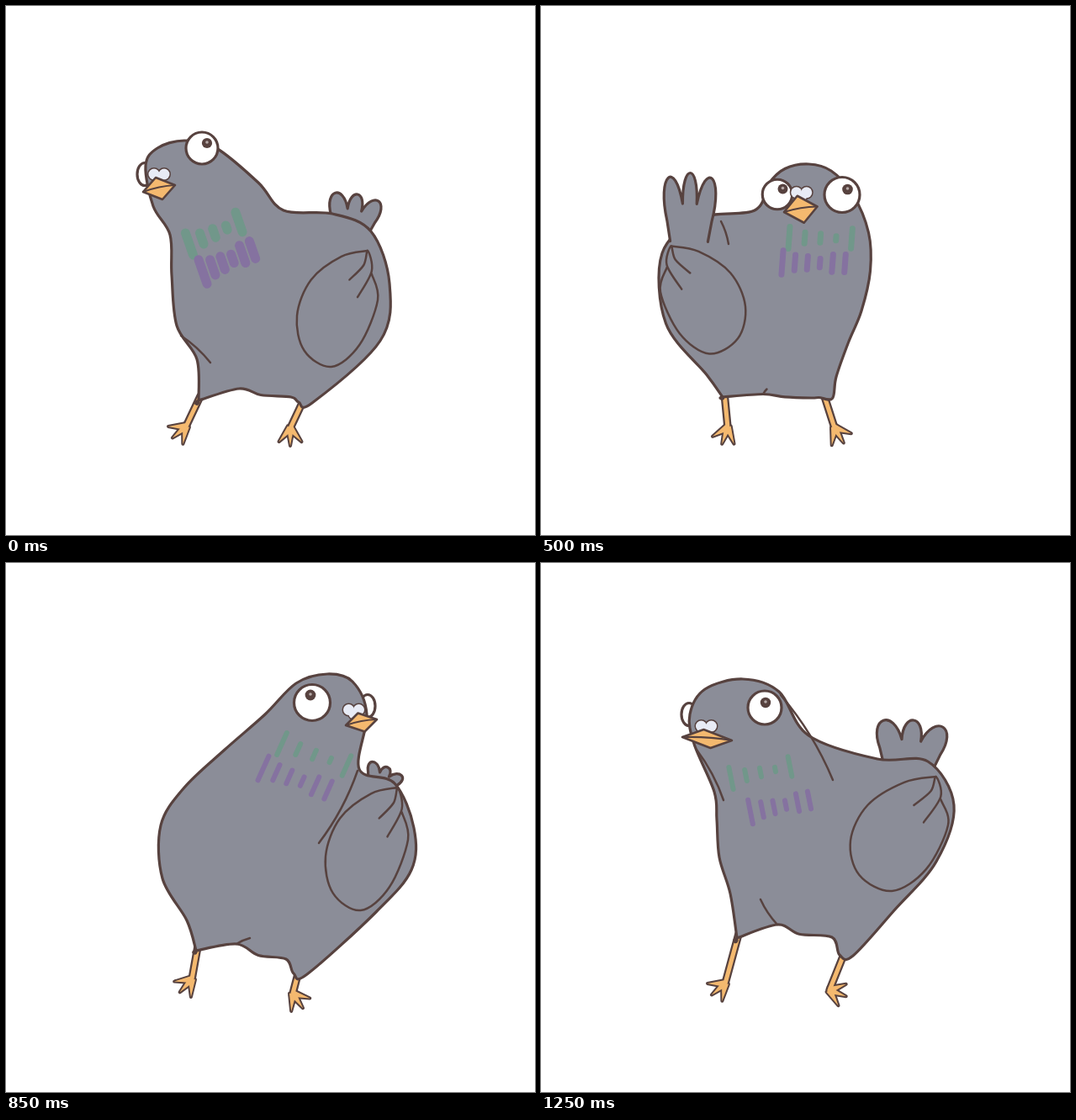
An HTML page with a canvas that plays this animation: 629 px wide and 629 px high, repeating every 1.3 s.

```html
<!DOCTYPE html>
<html lang="en">
<head>
<meta charset="utf-8">
<title>Dancing pigeon</title>
<style>
html, body { margin: 0; width: 100%; height: 100%; overflow: hidden; background: #fff; }
canvas { display: block; width: 100vmin; height: 100vmin; }
</style>
</head>
<body>
<canvas id="stage" width="629" height="629"></canvas>
<script>
const ctx = document.getElementById('stage').getContext('2d');
const INK = '#57423f', GREY = '#8b8d98', ORANGE = '#f4b96f';
const LOOP = 1300, STEP = 50;

// Rig values per pose:
//   back, front: outline points from face over the head to the right flank, and up the left side
//   belly: notch height, sag height, fold vector    tail: root, tip, half width
//   wings: centre, half width (negative mirrors, 0 hides), half height
//   eyes: centre, radius    beak: left, right, half height, cere shift
//   legs: hip, ankle, foot angle    chest: row start, row end, second row offset, slant, width
const poses = [
  { at: 0,
    back: [166,190, 180,169, 212,160, 250,169, 300,210, 330,243, 388,247, 434,268, 456,330, 445,398],
    front: [227,420, 203,380, 197,320, 195,272, 175,238],
    belly: [15, 9, 0, 0], tail: [410,265, 418,224, 28],
    wingL: [198,350, 0, 65], wingR: [394,360, 48, 69],
    eyeL: [165,200, 9], eyeR: [233,169, 19], gaze: [6, -6], beak: [163,221, 201,213, 13, 4],
    legL: [231,470, 214,500, 140], legR: [354,474, 338,502, 90],
    chest: [218,283, 277,257, 16,33, 0.35, 11], neck: [], fold: [208,392, 243,424] },
  { at: 200,
    back: [172,192, 185,172, 216,162, 258,174, 305,202, 345,248, 385,270, 419,302, 436,350, 418,422],
    front: [204,428, 178,390, 174,335, 203,286, 177,236],
    belly: [19, 9, 0, 0], tail: [300,305, 300,280, 15],
    wingL: [201,353, -27, 66], wingR: [426,352, 9, 48],
    eyeL: [170,204, 9], eyeR: [240,171, 19], gaze: [7, -5], beak: [168,226, 206,217, 13, 5],
    legL: [227,473, 223,503, 82], legR: [358,475, 346,502, 90],
    chest: [226,287, 285,260, 16,33, 0.35, 10], neck: [], fold: [] },
  { at: 400,
    back: [222,222, 235,206, 262,199, 290,208, 327,232, 368,264, 388,300, 392,340, 378,392, 350,432],
    front: [194,430, 152,365, 150,293, 190,245, 212,252],
    belly: [5, 2, 0, 0], tail: [180,285, 176,186, 28],
    wingL: [198,348, -51, 65], wingR: [390,345, 0, 48],
    eyeL: [226,237, 14], eyeR: [300,236, 26], gaze: [8, -9], beak: [215,257, 260,244, 14, 7],
    legL: [216,464, 220,500, 93], legR: [335,468, 348,499, 60],
    chest: [273,294, 337,270, 9,28, 0.3, 8], neck: [214,256, 232,310], fold: [] },
  { at: 600,
    back: [320,200, 345,181, 375,177, 400,184, 414,215, 411,275, 395,330, 370,385, 353,408, 352,450],
    front: [200,447, 145,390, 138,295, 190,259, 296,234],
    belly: [4, 3, 9, -12], tail: [172,275, 179,211, 28],
    wingL: [187,351, -50, 63], wingR: [388,345, 0, 60],
    eyeL: [336,211, 21.5], eyeR: [416,213, 16], gaze: [5, -4], beak: [363,233, 397,233, 18, 3],
    legL: [220,468, 224,502, 125], legR: [338,469, 350,504, 58],
    chest: [317,257, 402,283, -25,31, -0.45, 6], neck: [], fold: [] },
  { at: 850,
    back: [308,180, 345,143, 382,132, 412,141, 429,180, 420,245, 462,262, 485,315, 482,365, 440,415],
    front: [215,425, 186,375, 184,312, 212,267, 260,222],
    belly: [9, 20, 16, -7], tail: [445,262, 454,243, 20],
    wingL: [183,340, 0, 63], wingR: [429,340, 49, 73],
    eyeL: [364,166, 21.5], eyeR: [430,170, 9], gaze: [-2, -9], beak: [404,193, 441,186, 11, -5],
    legL: [228,462, 221,495, 133], legR: [348,491, 341,512, 55],
    chest: [328,215, 405,241, -22,29, -0.45, 6], neck: [418,247, 372,333], fold: [] },
  { at: 1100,
    back: [213,187, 228,171, 255,165, 298,175, 330,200, 352,219, 445,210, 495,232, 504,300, 478,368],
    front: [239,398, 222,355, 209,300, 207,255, 203,225],
    belly: [10, 20, 14, -7], tail: [470,230, 484,139, 37],
    wingL: [208,340, 0, 65], wingR: [436,321, 63, 80],
    eyeL: [209,208, 20], eyeR: [309,218, 21.5], gaze: [-4, -5], beak: [238,236, 281,236, 10, 0],
    legL: [238,454, 218,500, 147], legR: [354,478, 341,512, 25],
    chest: [246,285, 336,280, 0,38, 0.1, 8], neck: [343,212, 372,273], fold: [205,235, 222,290] },
  { at: 1250,
    back: [177,180, 195,150, 240,138, 283,153, 318,205, 400,233, 460,236, 491,288, 470,355, 420,413],
    front: [225,393, 212,350, 209,305, 206,272, 182,215],
    belly: [17, 24, -20, -30], tail: [437,240, 443,187, 38],
    wingL: [208,340, 0, 65], wingR: [426,322, 58, 68],
    eyeL: [176,180, 9], eyeR: [266,172, 20], gaze: [1, -6], beak: [168,207, 227,211, 11, 3],
    legL: [235,447, 219,500, 140], legR: [361,469, 343,508, 20],
    chest: [226,256, 296,242, 23,40, 0.2, 6], neck: [285,157, 347,258], fold: [185,222, 217,282] }
];
poses.push({ ...poses[0], at: LOOP });

const lerp = (a, b, u) => a + (b - a) * u;
const pairs = list => Array.from({ length: list.length >> 1 }, (_, i) => [list[2 * i], list[2 * i + 1]]);

// An empty line shrinks to, or grows from, the first point of the other one.
function mix(a, b, u) {
  if (!u || !(a.length + b.length)) return a;
  const from = a.length ? a : b.map((_, i) => b[i % 2]);
  const to = b.length ? b : a.map((_, i) => a[i % 2]);
  return from.map((v, i) => lerp(v, to[i], u));
}

function paint(path, fill, stroke = INK, width = 3.2) {
  if (fill) { ctx.fillStyle = fill; ctx.fill(path); }
  if (stroke) { ctx.strokeStyle = stroke; ctx.lineWidth = width; ctx.stroke(path); }
}

// Smooth curve through all points; a doubled point makes a corner.
function spline(p, closed) {
  const n = p.length, path = new Path2D();
  const point = i => closed ? p[(i + n) % n] : p[Math.max(0, Math.min(n - 1, i))];
  path.moveTo(...p[0]);
  for (let i = 0; i < (closed ? n : n - 1); i++) {
    const [a, b, c, d] = [-1, 0, 1, 2].map(k => point(i + k));
    path.bezierCurveTo(b[0] + (c[0] - a[0]) / 6, b[1] + (c[1] - a[1]) / 6,
      c[0] - (d[0] - b[0]) / 6, c[1] - (d[1] - b[1]) / 6, ...c);
  }
  if (closed) path.closePath();
  return path;
}

function drawBody({ back, front, belly: [rise, sag, foldX, foldY], legL: [lx, ly], legR: [rx, ry] }) {
  const hip = [lx - 2, ly - 1], notch = [lx + 46, ly - rise], low = ry - sag;
  const bottom = [[rx + 10, ry - 2], [rx - 6, ry - 3], [rx - 15, low],
    [lx + 72, lerp(notch[1], low, 0.75)], notch, hip, hip];
  paint(spline([...pairs(back), ...bottom, ...pairs(front)], true), GREY);
  if (foldX) drawFold([...notch, notch[0] + foldX, notch[1] + foldY]);
}

function drawFold([x0, y0, x1, y1]) {
  const path = new Path2D();
  path.moveTo(x0, y0);
  path.quadraticCurveTo((x0 + x1) / 2 + (y1 - y0) * 0.08, (y0 + y1) / 2 - (x1 - x0) * 0.08, x1, y1);
  paint(path, null, INK, 2.5);
}

// Three lobes on a fan; u runs along the tail, v across it.
function drawTail([x, y, tipX, tipY, half]) {
  const dx = tipX - x, dy = tipY - y, size = Math.hypot(dx, dy);
  const at = (u, v) => [x + dx * u - dy / size * half * v, y + dy * u + dx / size * half * v];
  const path = new Path2D(), edges = [-0.95, -0.3, 0.3, 0.95];
  path.moveTo(...at(0, -0.8));
  path.lineTo(...at(0.3, -0.95));
  for (let i = 0; i < 3; i++) {
    const u0 = i ? 0.55 : 0.3, u1 = i < 2 ? 0.55 : 0.3, peak = i === 1 ? 1 : 0.92;
    const lift = (peak - (u0 + u1) / 2) * 4 / 3, lean = (i - 1) * 0.42;
    path.bezierCurveTo(...at(u0 + lift, edges[i] + lean - 0.05),
      ...at(u1 + lift, edges[i + 1] + lean + 0.05), ...at(u1, edges[i + 1]));
  }
  path.lineTo(...at(0, 0.8));
  paint(path, GREY);
}

const WING = pairs([0.75,-1, 0.1,-0.9, -0.65,-0.5, -1,0.12, -0.82,0.72, -0.15,1, 0.55,0.62, 1,-0.15, 0.85,-0.6]);
const FEATHERS = pairs([0.3,-0.5, 0.65,-0.75, 0.75,-1, 0.85,-0.65, 0.5,-0.2]);

function drawWing([x, y, rx, ry]) {
  if (Math.abs(rx) < 3) return;
  for (const shape of [WING, FEATHERS])
    paint(spline(shape.map(([u, v]) => [x + u * rx, y + v * ry])), null, INK, 2.5);
}

// Shank and three tapered toes.
function drawLeg([hipX, hipY, x, y, angle]) {
  const path = new Path2D();
  path.moveTo(hipX, hipY - 6);
  path.lineTo(x, y);
  paint(path, null, INK, 9.5);
  const toes = [-40, 0, 40].map(turn => {
    const a = (angle + turn) * Math.PI / 180, c = Math.cos(a), s = Math.sin(a), toe = new Path2D();
    toe.moveTo(x - s * 4, y + c * 4);
    toe.lineTo(x + c * 21, y + s * 21);
    toe.lineTo(x + s * 4, y - c * 4);
    return toe;
  });
  for (const toe of toes) paint(toe, null, INK, 4);
  for (const toe of toes) paint(toe, ORANGE, null);
  paint(path, null, ORANGE, 5);
}

function disc(x, y, rx, ry = rx) {
  const path = new Path2D();
  path.ellipse(x, y, rx, ry, 0, 0, 2 * Math.PI);
  return path;
}

const inFront = eye => eye[2] > 14.5;

function drawEye(eye, [gazeX, gazeY]) {
  const [x, y, r] = eye;
  paint(disc(x, y, r, Math.max(13.5, r)), '#fff');
  if (!inFront(eye)) return;
  paint(disc(x + gazeX, y + gazeY, 4 + r / 9), INK, null);
  paint(disc(x + gazeX, y + gazeY - 1, 1.8), '#b5a9a7', null);
}

// Two rows of feather strokes of uneven length.
function drawChest([x0, y0, x1, y1, dx, dy, slant, width]) {
  const row = (colour, shiftX, shiftY, lengths) => {
    const path = new Path2D();
    lengths.forEach((length, i) => {
      const u = i / (lengths.length - 1), h = length * 13;
      const x = lerp(x0, x1, u) + shiftX, y = lerp(y0, y1, u) + shiftY;
      path.moveTo(x - h * slant, y - h);
      path.lineTo(x + h * slant, y + h);
    });
    paint(path, null, colour, width);
  };
  row('#71978a', 0, 0, [1, 0.5, 0.4, 0.2, 0.9]);
  row('#8572a0', dx, dy, [1.1, 0.7, 0.6, 0.4, 0.8, 0.8]);
}

function drawBeak([x0, y0, x1, y1, half, shift]) {
  const x = (x0 + x1) / 2, y = (y0 + y1) / 2, top = [x - 4, y - half];
  const cx = top[0] + shift, cy = top[1] - 4;
  const lobes = [disc(cx - 6, cy, 6.5), disc(cx + 6, cy, 6.5), disc(cx, cy + 5, 6)];
  for (const lobe of lobes) paint(lobe, null, INK, 3);
  for (const lobe of lobes) paint(lobe, '#e8ebf5', null);

  const path = new Path2D(), mouth = new Path2D();
  for (const corner of [[x0, y0], top, [x1, y1], [x + 4, y + half]]) path.lineTo(...corner);
  path.closePath();
  paint(path, ORANGE, INK, 2.6);
  mouth.moveTo(x0, y0);
  mouth.quadraticCurveTo(x, y - 3, x1, y1);
  paint(mouth, null, INK, 2.2);
}

function draw(time) {
  const next = poses.findIndex(pose => pose.at > time), from = poses[next - 1], to = poses[next];
  const u = (time - from.at) / (to.at - from.at), now = {};
  for (const part in from) if (part !== 'at') now[part] = mix(from[part], to[part], u);
  const tailInFront = time >= 400 && time <= 600;
  const drawEyes = front => [now.eyeL, now.eyeR].forEach(eye => inFront(eye) === front && drawEye(eye, now.gaze));

  ctx.fillStyle = '#fff';
  ctx.fillRect(0, 0, 629, 629);
  ctx.lineCap = ctx.lineJoin = 'round';
  if (!tailInFront) drawTail(now.tail);
  drawEyes(false);
  drawLeg(now.legL);
  drawLeg(now.legR);
  drawBody(now);
  if (tailInFront) drawTail(now.tail);
  drawChest(now.chest);
  for (const line of [now.neck, now.fold]) if (line.length) drawFold(line);
  drawWing(now.wingL);
  drawWing(now.wingR);
  drawEyes(true);
  drawBeak(now.beak);
}

function tick() {
  draw(Math.floor(performance.now() % LOOP / STEP) * STEP);
  requestAnimationFrame(tick);
}
tick();
</script>
</body>
</html>
```
